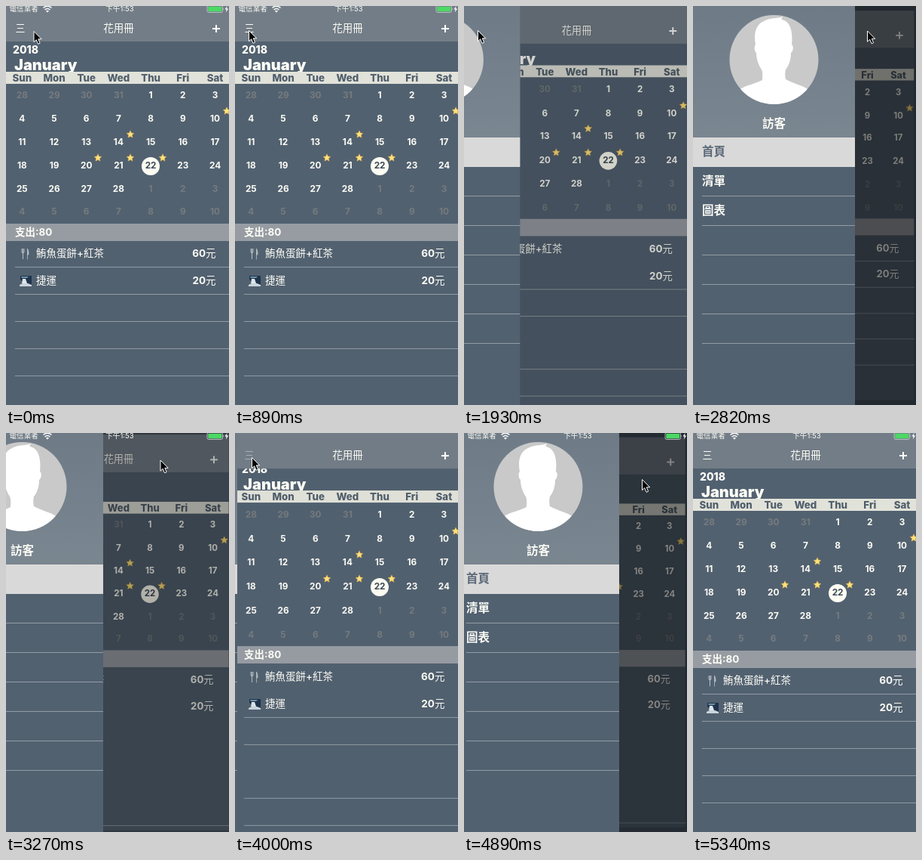
An HTML page that plays this animation: 296x528 px, repeating every 6.14 s.

```html
<!DOCTYPE html>
<html lang="zh-Hant">
<head>
<meta charset="utf-8">
<title>記帳</title>
<style>
/* p: menu progress, c: compact page layout, bar: status bar, press: menu button,
   rule / still: table rules, x y: pointer */
@property --p { syntax: "<number>"; inherits: true; initial-value: 0; }
@property --c { syntax: "<number>"; inherits: true; initial-value: 0; }
@property --bar { syntax: "<number>"; inherits: true; initial-value: 1; }
@property --press { syntax: "<number>"; inherits: true; initial-value: 0; }
@property --rule { syntax: "<number>"; inherits: true; initial-value: 1; }
@property --still { syntax: "<number>"; inherits: true; initial-value: 1; }
@property --x { syntax: "<number>"; inherits: true; initial-value: 37; }
@property --y { syntax: "<number>"; inherits: true; initial-value: 33; }

html, body { margin: 0; width: 100%; height: 100%; overflow: hidden; background: #45525f; }
#stage {
  position: absolute; left: 0; top: 0; width: 296px; height: 528px; overflow: hidden;
  background: #45525f; color: #fdfdf6;
  font: 700 13.5px/1 Inter, "Noto Sans CJK TC", "Noto Sans CJK", sans-serif;
  animation: menu 6140ms step-end infinite, pointer 6140ms step-end infinite;
}
#stage div, #stage svg { position: absolute; }
#page { inset: 0; transform: scale(calc(1 - .038 * var(--p))); }
#paper { left: -4px; top: -4px; width: 303px; height: 536px; background: #526170; }
#page .at { top: calc(var(--a) * 1px + (var(--b) - var(--a)) * var(--c) * 1px); }
.t { white-space: nowrap; transform: translate(-50%, -50%); }
.l { transform: translate(0, -50%); }
.r { transform: translate(-100%, -50%); }
.year { font-size: 14px; font-weight: 800; }
.month { font-size: 20px; font-weight: 900; }
.week { font-size: 13.3px; font-weight: 800; color: #505e6b; }
.day { font-size: 11.8px; }
.off { color: #767b7e; }
.today { color: #3f4b57; }
.strip { left: -4px; width: 303px; height: 16px; background: #e1e2d9; }
.sum { left: -4px; width: 303px; height: 23px; background: #979ca3; }
.soft { font-weight: 500; }
.disc { left: 180px; width: 24px; height: 24px; border-radius: 50%; background: #fdfdf3; }
.rule { left: 12px; width: 288px; height: 1px; background: #909aa2; opacity: var(--rule); }
.rule.mid { opacity: calc(var(--rule) * var(--still)); }
.rule.end { opacity: calc(1 - var(--still)); }
#nav { left: -4px; top: -4px; width: 303px; height: 51px; background: #737d87; }
.title { font-weight: 500; }
.burger { font-size: 13px; font-weight: 500; opacity: calc(1 - .6 * var(--press)); }
.plus { width: 10px; height: 10px;
  background: linear-gradient(#fff, #fff) 50%/10px 2px no-repeat, linear-gradient(#fff, #fff) 50%/2px 10px no-repeat; }
#dim { inset: 0; background: #000; opacity: calc(.5 * var(--p)); }
#menu { left: 0; top: 0; width: 215px; height: 528px; background: #526170;
  transform: translateX(calc((var(--p) - 1) * 215px)); }
#head { width: 100%; height: 174px; background: linear-gradient(#6e7b87, #7a8690); }
#home { top: 174px; width: 100%; height: 39px; background: #d9d9d9; }
#menu .t { font-size: 15.5px; }
#menu .line { left: 12px; right: 0; height: 1px; background: #929ba4; }
#bar { inset: 0 0 auto; height: 12px; opacity: var(--bar); font-size: 9.6px; font-weight: 400; }
#pointer { left: 0; top: 0; overflow: visible; transform: translate(calc(var(--x) * 1px), calc(var(--y) * 1px)); }

@keyframes menu {
  0% { --p: 0; --c: 0; --bar: 1; --press: 0; --rule: 1; --still: 1; }
  26.71% { --press: 1; }
  28.99% { --p: .014; --c: 1; --bar: 0; --still: 0; }
  31.43% { --p: .346; }
  33.87% { --p: .8; }
  36.31% { --p: .98; }
  38.76% { --p: 1; --still: 1; --press: 0; }
  50.81% { --p: .958; --c: 0; --bar: 1; --rule: 0; --still: 0; }
  53.25% { --p: .6; }
  55.70% { --p: .14; }
  57.98% { --p: 0; --rule: 1; --still: 1; }
  65.14% { --p: .014; --c: 1; --bar: 0; --press: 1; --still: 0; }
  67.58% { --p: .36; }
  70.03% { --p: .84; }
  72.47% { --p: 1; --still: 1; --press: 0; }
  79.64% { --p: .958; --c: 0; --bar: 1; --rule: 0; --still: 0; }
  82.08% { --p: .6; }
  84.52% { --p: .14; }
  86.97%, 100% { --p: 0; --c: 0; --bar: 1; --press: 0; --rule: 1; --still: 1; }
}
@keyframes pointer {
  0% { --x: 37; --y: 33.5; }
  7.32% { --x: 28; --y: 32; }
  9.77% { --x: 19; --y: 33; }
  14.49% { --x: 18.5; --y: 32.5; }
  36.31% { --x: 40; --y: 40; }
  38.76% { --x: 110; --y: 52; }
  41.20% { --x: 185; --y: 48; }
  43.64% { --x: 221; --y: 34; }
  45.92% { --x: 231.5; --y: 33; }
  53.25% { --x: 205; --y: 36; }
  55.70% { --x: 120; --y: 40; }
  57.98% { --x: 45; --y: 35; }
  60.42% { --x: 22.5; --y: 32.5; }
  67.58% { --x: 40; --y: 38; }
  70.03% { --x: 165; --y: 60; }
  72.47% { --x: 236.5; --y: 61.5; }
  86.97%, 100% { --x: -40; --y: 62; }
}
</style>
</head>
<body>
<div id="stage">
  <div id="page">
    <div id="paper"></div>
    <div id="sheet"></div>
    <div id="nav"></div>
    <div class="t burger" style="left:19px;top:29px">三</div>
    <div class="t title" style="left:149.5px;top:29.5px">花用冊</div>
    <div class="plus" style="left:274px;top:25px"></div>
  </div>
  <div id="dim"></div>
  <div id="menu">
    <div id="head"></div>
    <div id="home"></div>
    <svg width="216" height="140">
      <clipPath id="round"><circle cx="107.5" cy="71" r="59"/></clipPath>
      <g clip-path="url(#round)">
        <rect width="216" height="140" fill="#c9c9c9"/>
        <path fill="#fff" d="M92 98C92 92 93 89 91 84C86 77 84 68 84 62C81 60 81 53 83 51C80 36 84 24 94 20C102 15 112 17 119 14C118 16 117 17 118 18C128 20 133 31 131 51C134 53 133 60 130 62C130 70 128 78 123 84C122 89 122 92 123 97C135 104 150 105 158 115V132H57V115C65 105 81 104 92 98Z"/>
      </g>
    </svg>
    <div class="t" style="left:107.5px;top:156px">訪客</div>
  </div>
  <div id="bar">
    <div class="t l" style="left:4.5px;top:4px">電信業者</div>
    <div class="t" style="left:151px;top:4px">下午1:53</div>
    <svg width="296" height="12" fill="none" stroke="#fff">
      <path stroke-width="1.5" d="M49.5 2.5Q55 -2 60.5 2.5M51.5 5Q55 2 58.5 5"/>
      <path fill="#fff" stroke="none" d="M53 6.5Q55 5 57 6.5L55 8.8Z"/>
      <rect x="267" y="-.5" width="20.5" height="9" rx="2" stroke="#c8ced3" stroke-width=".8"/>
      <rect x="268.3" y=".8" width="18" height="6.4" rx="1" fill="#4cd964" stroke="none"/>
      <path fill="#c8ced3" stroke="none" d="M288.3 2.5q1.5 1.5 0 3z"/>
      <path fill="#fff" stroke="none" d="M293.5 0L290.5 4.6H292.6L291.8 8.5L295.2 3.5H293Z"/>
    </svg>
  </div>
  <svg id="pointer" width="12" height="18">
    <path d="M0 0V14.2L3.2 11.2L5.6 16.8L8.1 15.7L5.8 10.3H10.2Z" fill="#000" stroke="#fff" stroke-width="1"/>
  </svg>
</div>
<script>
const sheet = document.getElementById("sheet");
const menu = document.getElementById("menu");

function add(parent, cls, x, html = "") {
  const el = document.createElement("div");
  el.className = cls;
  if (x !== null) el.style.left = x + "px";
  el.innerHTML = html;
  parent.append(el);
  return el;
}

// a: top in the normal layout, b: top in the compact one
function put(cls, x, a, b, html) {
  const el = add(sheet, "at " + cls, x, html);
  el.style.setProperty("--a", a);
  el.style.setProperty("--b", b);
}

const colX = c => 21.3 + 42.7 * c;
const rowA = r => 119.2 + 30.85 * r;
const rowB = r => 108.8 + 31.8 * r;

put("t l year", 9, 57.5, 47.5, "2018");
put("t l month", 11, 78, 68, "January");
put("strip", null, 87, 76);
"Sun Mon Tue Wed Thu Fri Sat".split(" ").forEach((name, c) => put("t week", colX(c), 95.6, 85, name));

put("disc", null, rowA(3) - 12.2, rowB(3) - 12.2);
for (let i = 0; i < 42; i++) {
  const c = i % 7, r = Math.floor(i / 7), n = i - 3;
  const off = n < 1 || n > 28;
  const day = n < 1 ? n + 31 : n > 28 ? n - 28 : n;
  put("t day" + (off ? " off" : n === 22 ? " today" : ""), colX(c), rowA(r), rowB(r), day);
}

const starPath = Array.from({ length: 10 }, (_, i) => {
  const a = i * Math.PI / 5, d = i % 2 ? 2.5 : 5.2;
  return (6 + d * Math.sin(a)).toFixed(2) + "," + (6 - d * Math.cos(a)).toFixed(2);
}).join(" ");
const star = `<svg width="12" height="12" style="left:-6px;top:-6px"><polygon points="${starPath}" fill="#ffe27c" stroke="#d9a544" stroke-width=".5"/></svg>`;
for (const n of [10, 14, 20, 21, 22]) {
  const i = n + 3, r = Math.floor(i / 7);
  put("", colX(i % 7) + 15.7, rowA(r) - 11, rowB(r) - 11, star);
}

put("sum", null, 287.5, 282);
put("t l", 12, 299.7, 294.4, "支出:80");

const fork = `<svg width="16" height="18" style="left:-8px;top:-9px" fill="none" stroke="#c3cad0">
  <path d="M3 2V6Q3 8 4.5 8Q6 8 6 6V2M4.5 2V16" stroke-width=".9"/>
  <path d="M10.5 16.5V2Q12.3 5 12 10H10.5" fill="#aeb7bf" stroke-width=".7"/></svg>`;
const train = `<svg width="18" height="16" style="left:-9px;top:-8px">
  <path d="M2 1H17V14H4V8L2 6Z" fill="#20344b"/>
  <path d="M3 2H13L11 4H4Z" fill="#6f93ab"/>
  <path d="M5 5H9L11 11H4Z" fill="#dce6ec"/>
  <path d="M1 13L5 11H12L17 13V15H1Z" fill="#c9d4dc"/></svg>`;

[[fork, "鮪魚蛋餅+紅茶", "60"], [train, "捷運", "20"]].forEach(([icon, name, cost], i) => {
  const a = 327.8 + 36 * i, b = 322.8 + 35.8 * i;
  put("", 26, a, b, icon);
  put("t l soft", 40, a, b, name);
  put("t r", 278.5, a, b, `${cost}<span class="soft">元</span>`);
});

// some rules vanish while the page is moving
const ruleKind = { 0: " mid", 3: " mid", 5: " end" };
for (let i = 0; i < 6; i++)
  put("rule" + (ruleKind[i] || ""), null, 345 + 36 * i, 340 + 35.8 * i);

["首頁", "清單", "圖表"].forEach((name, i) => {
  const el = add(menu, "t l", 12, name);
  el.style.top = 193 + 39 * i + "px";
  if (!i) el.style.color = "#5b6978";
});
for (let i = 0; i < 6; i++) add(menu, "line", null).style.top = 251 + 39 * i + "px";
</script>
</body>
</html>
```
